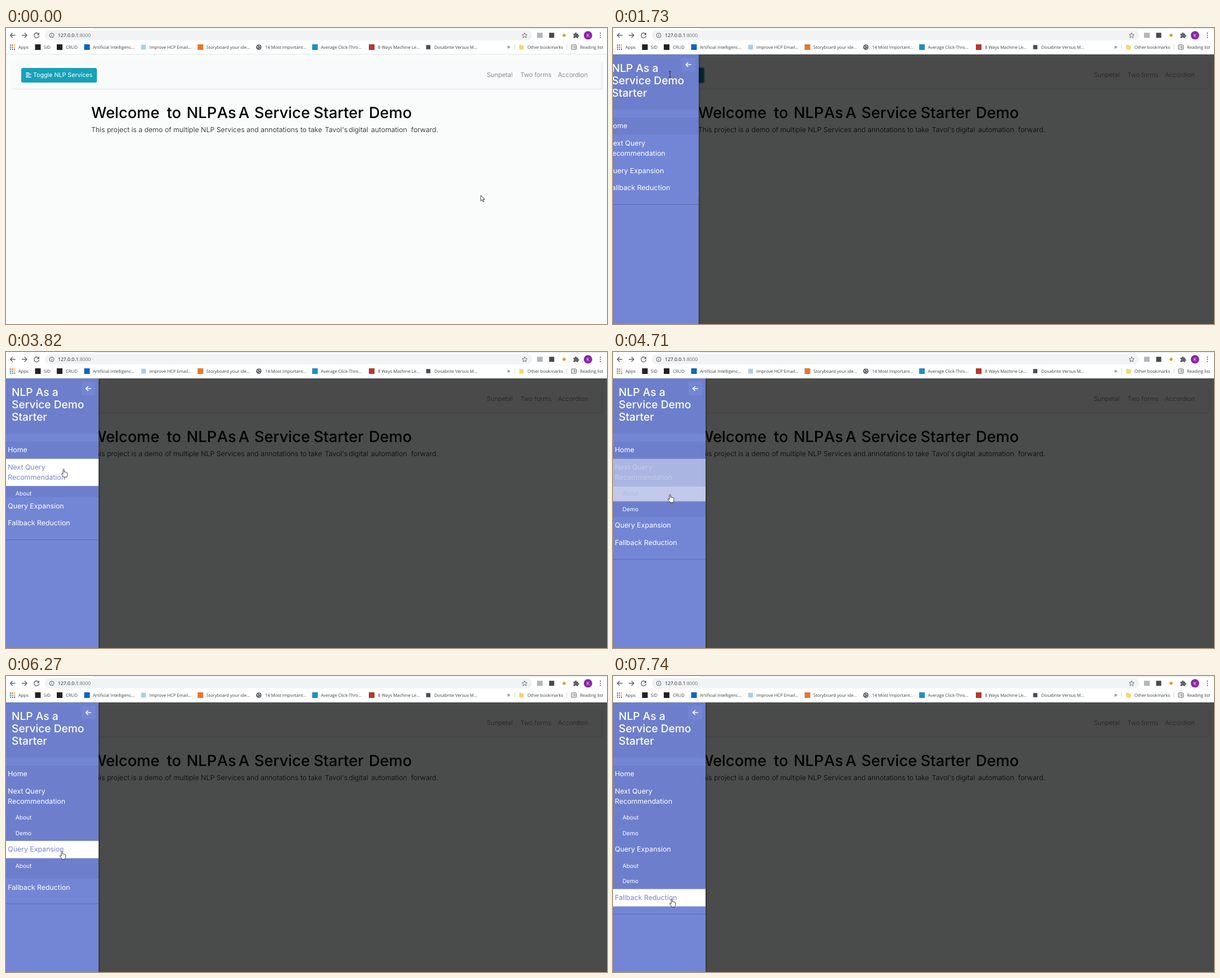
Animation, 1065 px wide and 526 px high, one loop 8000 ms. Source, as an HTML page:

```html
<!DOCTYPE html>
<html lang="en">
<head>
<meta charset="utf-8">
<title>NLP services demo</title>
<style>
  html, body { margin: 0; width: 100%; height: 100%; overflow: hidden; background: #fff; }
  svg { display: block; }
  text { white-space: pre; text-rendering: geometricPrecision; }
  .ui { font-family: "Open Sans", "Noto Sans", sans-serif; font-size: 7.7px; fill: #3c4043; }
  .page { font-family: Inter, "Open Sans", sans-serif; }
</style>
</head>
<body>
<svg id="stage" width="1065" height="526" viewBox="0 0 1065 526">
  <defs>
    <filter id="navShadow" x="-5%" y="-20%" width="110%" height="140%">
      <feDropShadow dx="1" dy="1" stdDeviation="1" flood-opacity=".14"/>
    </filter>
    <filter id="sideShadow" x="-5%" y="-5%" width="112%" height="110%">
      <feDropShadow dx="2" dy="2" stdDeviation="1" flood-opacity=".25"/>
    </filter>
  </defs>
  <rect y="46" width="1065" height="480" fill="#fafbfb"/>
  <g id="page" class="page">
    <rect x="10" y="60" width="1045" height="47.5" fill="#f9fafb" filter="url(#navShadow)"/>
    <rect id="ring" x="24.8" y="68.8" width="138.4" height="30.4" rx="5" fill="#3ab0c3" opacity="0"/>
    <rect id="button" x="27" y="71" width="134" height="26" rx="2.8"/>
    <path d="M35.3 79.6h6.2M35.3 82.2h9.6M35.3 84.8h6.2M35.3 87.4h9.6" stroke="#fff" stroke-width="1.3"/>
  </g>
  <rect id="overlay" y="46" width="1065" height="480" fill="#000" opacity=".7"/>
  <g id="side" class="page">
    <rect y="47" width="164" height="490" fill="#7386d5" filter="url(#sideShadow)"/>
    <rect y="47" width="164" height="98.3" fill="#6d7fcc"/>
    <rect x="134" y="53" width="24" height="24" fill="#7386d5"/>
    <path d="M150.8 65h-9M145.6 61l-4 4 4 4" fill="none" stroke="#fff" stroke-width="1.6"/>
  </g>
  <g id="chrome" class="ui">
    <rect width="1065" height="46.5" fill="#fff"/>
    <rect x="155" width="910" height="1" fill="#dee1e6"/>
    <rect y="46" width="1065" height="1" fill="#e1e4e8"/>
    <g fill="none" stroke="#5f6368" stroke-width="1.3">
      <path d="M16.5 13H7.6M11.8 8.7L7.5 13l4.3 4.3"/>
      <path d="M28 13h8.9M32.7 8.7L37 13l-4.3 4.3"/>
      <path d="M57.6 10.3A4.4 4.4 0 1 0 58.6 13.8"/>
    </g>
    <path d="M59 8v4.4h-4.4z" fill="#5f6368"/>
    <rect x="69" y="3.7" width="863" height="18.4" rx="9.2" fill="#f1f3f4"/>
    <circle cx="81" cy="13" r="4" fill="none" stroke="#5f6368"/>
    <path d="M81 12.3v3M81 10.3v1.1" stroke="#5f6368"/>
    <path d="M919 8.6l1.3 3 3.2.3-2.4 2.1.7 3.2-2.8-1.7-2.8 1.7.7-3.2-2.4-2.1 3.2-.3z" fill="none" stroke="#5f6368" stroke-width=".9"/>
    <rect x="941" y="8.5" width="10" height="9" fill="#b4b6b9"/>
    <rect x="962.5" y="8.5" width="9" height="9" fill="#45484d"/>
    <circle cx="989" cy="13" r="2.7" fill="#e8952e"/>
    <path d="M1005.5 10h2.6a1.7 1.7 0 1 1 3.3 0h2.4v2.5a1.6 1.6 0 1 1 0 3.1v2.3h-2.5a1.6 1.6 0 0 0-3.1 0h-2.7v-2.6a1.5 1.5 0 0 0 0-2.9z" fill="#5f6368"/>
    <circle cx="1031.3" cy="13" r="7.5" fill="#8e24aa"/>
    <g fill="#5f6368">
      <circle cx="1053.3" cy="9.2" r="1.1"/><circle cx="1053.3" cy="13" r="1.1"/><circle cx="1053.3" cy="16.8" r="1.1"/>
    </g>
    <circle cx="448" cy="34" r="4.8" fill="#5f6368"/>
    <path d="M444.6 32.4l2.2 1.4-.6 2M448 30.2l1 2.4 2.2 1M449 37l1.2-1.6" stroke="#fff" fill="none"/>
    <path d="M909.5 29.8h3.4l1 1.2h3.6v7.6h-8z" fill="#f9d56e"/>
    <rect x="1002" y="30" width="8.6" height="8" rx="1" fill="none" stroke="#5f6368"/>
    <path d="M1003.8 32.4h1M1003.8 34h1M1003.8 35.6h1M1005.8 32.4h3.2M1005.8 34h3.2M1005.8 35.6h3.2" stroke="#5f6368" stroke-width=".8"/>
    <path d="M901.5 29v10M994 29v10" stroke="#d5d8dc"/>
  </g>
  <circle id="click" r="8" fill="#ffe600" opacity=".55"/>
  <g id="cursor">
    <path id="arrow" d="M.3.3V10.4L2.7 8.2 4.3 12 5.9 11.3 4.3 7.6H7.4Z" fill="#fff" stroke="#111" stroke-width=".8"/>
    <path id="beam" d="M-2-5h1.3L0-4.4.7-5H2M0-4.4V4.9M-2 5.5h1.3L0 4.9l.7.6H2" fill="none" stroke="#111" stroke-width=".8"/>
    <path id="hand" transform="translate(-4 0)" fill="#fff" stroke="#111" stroke-width=".8" d="M3 1.3C3-.2 5.2-.2 5.2 1.3V5.4C5.4 4.6 7 4.6 7.2 5.8 7.6 5.1 9 5.3 9.1 6.4 9.6 5.9 10.8 6.2 10.8 7.4V10.5C10.8 12 9.8 12.6 9.6 14.5H4C3.8 12.8 1.6 11 .7 9.3 0 8.1 1.4 7.4 2.2 8.3L3 9.2Z"/>
  </g>
</svg>
<script>
const LOOP = 8000;
const $ = id => document.getElementById(id);
const WHITE = [255, 255, 255], BLUE = [115, 134, 213], DEEP = [109, 127, 204];

function add(parent, tag, attrs, content) {
  const node = document.createElementNS("http://www.w3.org/2000/svg", tag);
  for (const k in attrs) node.setAttribute(k, attrs[k]);
  if (content) node.textContent = content;
  parent.appendChild(node);
  return node;
}
const write = (parent, x, y, s, attrs) => add(parent, "text", { x, y, ...attrs }, s);
const set = (node, k, v) => node.setAttribute(k, v);
const show = (node, on) => set(node, "visibility", on ? "visible" : "hidden");
const clamp = v => Math.max(0, Math.min(1, v));
const mix = (a, b, p) => a.map((v, i) => v + (b[i] - v) * p);
const rgb = c => `rgb(${c.map(Math.round)})`;

// The CSS "ease" curve, cubic-bezier(.25, .1, .25, 1)
function ease(x) {
  x = clamp(x);
  if (x === 0 || x === 1) return x;
  let lo = 0, hi = 1, s = 0.5;
  for (let i = 0; i < 24; i++) {
    s = (lo + hi) / 2;
    const r = 1 - s;
    if (0.75 * r * s + s ** 3 < x) lo = s; else hi = s;
  }
  const r = 1 - s;
  return 0.3 * r * r * s + 3 * r * s * s + s ** 3;
}
const ramp = (t, start, ms) => ease((t - start) / ms);

// Browser bars
const bar = $("chrome");
const url = write(bar, 92, 16.1, "127.0.0.1", { "font-size": 8.6, fill: "#202124" });
add(url, "tspan", { fill: "#70757a" }, ":8000");
write(bar, 1031.3, 15.9, "K", { "font-size": 8, fill: "#fff", "text-anchor": "middle" });
[[22, "Apps"], [67, "SID"], [106, "CRUD"], [154, "Artificial Intelligenc..."],
 [254, "Improve HCP Email..."], [355, "Storyboard your ide..."], [459, "14 Most Important..."],
 [558, "Average Click-Thro..."], [659, "8 Ways Machine Le..."], [759, "Dosabrite Versus M..."],
 [924, "Other bookmarks"], [1017, "Reading list"]
].forEach(([x, s]) => write(bar, x, 36.8, s));
write(bar, 888, 37.2, "»", { "font-size": 11 });
[[51.5, 10, "#222"], [90, 10, "#222"], [138.5, 10, "#0a66c2"], [239.5, 8.5, "#a9cfe6"],
 [339.5, 10, "#e8762c"], [542.5, 10, "#1b8fc4"], [643, 10, "#b5392b"], [744.5, 7.5, "#4a4d55"]
].forEach(([x, w, fill]) => add(bar, "rect", { x, y: 34 - w / 2, width: w, height: w, fill }));
const dots = ["#ea4335", "#ea4335", "#fbbc04", "#34a853", "#4285f4", "#fbbc04", "#34a853", "#4285f4", "#ea4335"];
dots.forEach((fill, i) => add(bar, "rect", {
  x: 6.8 + i % 3 * 3.6, y: 29.4 + Math.floor(i / 3) * 3.6, width: 2.2, height: 2.2, fill
}));

// Page text
const page = $("page");
write(page, 48, 87.3, "Toggle NLP Services", { "font-size": 10.7, fill: "#fff" });
[[852, "Sunpetal"], [911.5, "Two forms"], [978, "Accordion"]].forEach(([x, s]) =>
  write(page, x, 87.3, s, { "font-size": 11.2, "font-weight": 300, fill: "#000", "fill-opacity": 0.56 }));
[[151, "Welcome"], [285, "to"], [320, "NLP"], [374, "As"], [412, "A"], [440, "Service"],
 [545, "Starter"], [643, "Demo"]
].forEach(([x, s]) => write(page, x, 159.8, s, { "font-size": 27.2, "font-weight": 500 }));
[[151, "This project is a demo of multiple NLP Services and annotations to take"],
 [565, "Tavol's"], [607.5, "digital"], [647, "automation"], [718, "forward."]
].forEach(([x, s]) => write(page, x, 185.2, s,
  { "font-size": 12.25, "font-weight": 300, "letter-spacing": 0.06, fill: "#111" }));

// Sidebar
const side = $("side");
["NLP As a", "Service Demo", "Starter"].forEach((s, i) =>
  write(side, 10, 78 + i * 22.1, s, { "font-size": 19.2, "font-weight": 500, fill: "#fff" }));

const OPEN1 = 3740, OPEN2 = 6135, SUB = 27.4, NEVER = 1e6;
const items = [];
// from/to: the time the pointer enters and leaves; opened: when it turns to the deep tone
function item(parent, y, h, lines, from, to, opened, small) {
  const rect = add(parent, "rect", { y, width: 164, height: h });
  const texts = lines.map((s, i) => write(parent, small ? 16.7 : 3.2,
    y + (small ? 17 : 19.4) + i * 17.7, s, { "font-size": small ? 10.2 : 12.35 }));
  items.push({ rect, texts, from, to, opened });
}
function submenu(parent, y, times) {
  const box = add(parent, "svg", { x: 0, y, width: 164, height: 0, overflow: "hidden" });
  item(box, 0, SUB, ["About"], times[0], times[1], -NEVER, true);
  item(box, SUB, SUB, ["Demo"], times[1], times[2], -NEVER, true);
  return box;
}
item(side, 159, 30.8, ["Home"], NEVER, NEVER, -NEVER);
item(side, 189.8, 48.4, ["Next Query", "Recommendation"], 3330, 4610, OPEN1);
const sub1 = submenu(side, 238.2, [4610, 5090, 5610]);
const lower = add(side, "g", {});
item(lower, 238.2, 30.8, ["Query Expansion"], 5610, 6700, OPEN2);
const sub2 = submenu(lower, 269, [6700, 7190, 7390]);
const last = add(lower, "g", {});
item(last, 269, 30.8, ["Fallback Reduction"], 7390, NEVER, NEVER);
add(last, "rect", { y: 313, width: 164, height: 1, fill: "#5b6cb2" });

// Pointer hot spot: time, x, y, and 1 for a smooth start and stop
const path = [
  [60, 841, 297], [870, 117, 97, 1], [1080, 101, 82, 1], [2320, 101, 82], [2340, 102, 82],
  [2500, 102, 82], [2800, 108, 116], [3140, 114, 167], [3270, 110, 184], [3340, 107, 191],
  [3560, 102, 208], [4260, 102, 208], [4610, 101, 238], [4710, 101, 253], [5040, 101, 264],
  [5110, 101, 268], [5380, 101, 283], [5480, 101, 283], [5610, 100, 293], [5950, 99, 311],
  [6480, 99, 311], [6700, 100, 324], [7140, 102, 346], [7190, 102, 351], [7390, 103, 379],
  [7720, 104, 396], [LOOP, 104, 396]
];
function pointer(t) {
  if (t <= path[0][0]) return path[0].slice(1, 3);
  const i = path.findIndex(k => k[0] > t);
  const a = path[i - 1], b = path[i];
  let p = (t - a[0]) / (b[0] - a[0]);
  if (b[3]) p = p * p * (3 - 2 * p);
  return mix(a.slice(1, 3), b.slice(1, 3), p);
}
const presses = [[1410, 1540], [3620, 3740], [6010, 6135]];
const within = (t, [a, b]) => t >= a && t < b;

function draw(t) {
  const slide = ramp(t, 1530, 300), open = t >= 1530;
  set(side, "transform", `translate(${-168 * (1 - slide)} 0)`);
  show(side, open);
  show($("overlay"), open);
  const hover = mix([23, 162, 184], [19, 132, 150], ramp(t, 930, 150));
  set($("button"), "fill", rgb(mix(hover, [17, 122, 139], ramp(t, 1400, 80))));
  set($("ring"), "opacity", 0.5 * ramp(t, 1510, 150));

  const h1 = 2 * SUB * ramp(t, OPEN1, 350), h2 = 2 * SUB * ramp(t, OPEN2, 350);
  set(sub1, "height", h1);
  set(sub2, "height", h2);
  set(lower, "transform", `translate(0 ${h1})`);
  set(last, "transform", `translate(0 ${h2})`);
  for (const it of items) {
    const lit = ramp(t, it.from, 300) * (1 - ramp(t, it.to, 300));
    const base = mix(BLUE, DEEP, ramp(t, it.opened, 300));
    set(it.rect, "fill", rgb(mix(base, WHITE, lit)));
    it.texts.forEach(n => set(n, "fill", rgb(mix(WHITE, BLUE, lit))));
  }

  const [x, y] = pointer(t);
  const beam = t >= 1600 && y < 123;
  const hand = !beam && (within(t, [940, 1600]) || (t > 1600 && y >= 159));
  set($("cursor"), "transform", `translate(${x} ${y})`);
  show($("beam"), beam);
  show($("hand"), hand);
  show($("arrow"), !beam && !hand);
  set($("click"), "cx", x - 1);
  set($("click"), "cy", y);
  show($("click"), presses.some(p => within(t, p)));
}

const began = performance.now();
function tick() {
  draw((performance.now() - began) % LOOP);
  requestAnimationFrame(tick);
}
tick();
</script>
</body>
</html>
```
